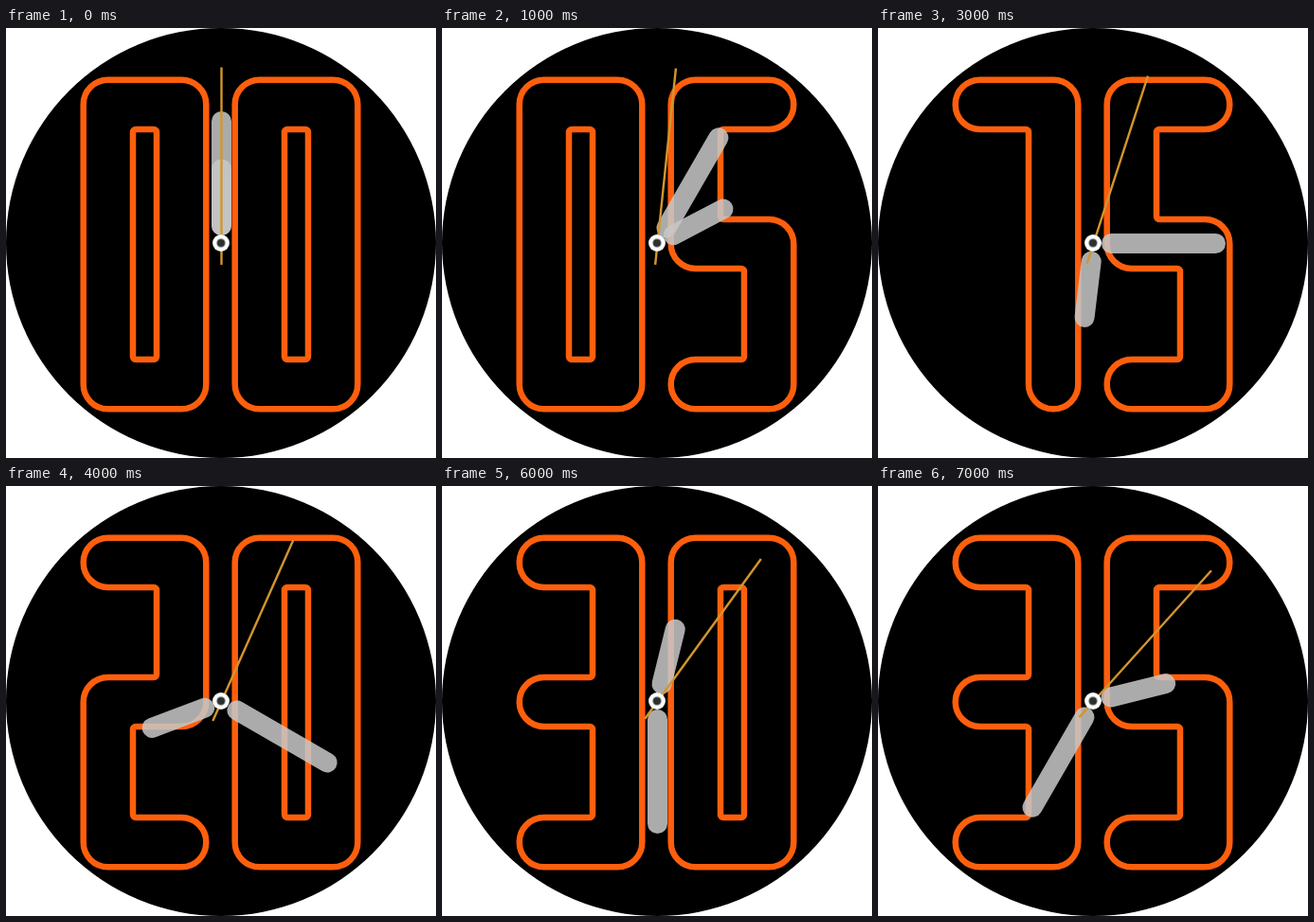
Recreate the animation shown at these times as an HTML page with a canvas. Size 454x454 px, loop 8 s.

```html
<!DOCTYPE html>
<html lang="en">
<head>
<meta charset="utf-8">
<title>Clock face with outlined minutes</title>
<style>
  html, body { margin: 0; width: 100%; height: 100%; overflow: hidden; background: #fff; }
  canvas { display: block; }
</style>
</head>
<body>
<canvas id="face" width="454" height="454"></canvas>
<script>
const ctx = document.getElementById('face').getContext('2d');
const CENTER = 227, PIVOT = 227.5, STEP = 1000, STEPS = 8;

// Grid lines shared by all digits; each outline is a list of "column row" pairs.
const COLS = [81.7, 134, 159, 211.3];
const ROWS = [54.7, 107, 202, 254, 350, 402.3];
const DIGITS = {
  0: ['00 30 35 05', '11 21 24 14'],
  1: ['00 30 35 25 21 01'],
  2: ['00 30 33 13 14 34 35 05 02 22 21 01'],
  3: ['00 30 35 05 04 24 23 03 02 22 21 01'],
  5: ['00 30 31 11 12 32 35 05 04 24 23 03']
};

function outline(shape, dx) {
  const pts = shape.split(' ').map(([c, r]) => ({
    x: COLS[c] + dx,
    y: ROWS[r],
    r: c % 3 === 0 || r % 5 === 0 ? 26 : 3
  }));
  const last = pts[pts.length - 1];
  ctx.beginPath();
  ctx.moveTo((pts[0].x + last.x) / 2, (pts[0].y + last.y) / 2);
  pts.forEach((p, i) => {
    const next = pts[(i + 1) % pts.length];
    ctx.arcTo(p.x, p.y, next.x, next.y, p.r);
  });
  ctx.closePath();
  ctx.stroke();
}

function digit(value, dx) {
  ctx.strokeStyle = '#ff5f0c';
  ctx.lineWidth = 6.5;
  DIGITS[value].forEach(shape => outline(shape, dx));
}

function disc(radius, color) {
  ctx.fillStyle = color;
  ctx.beginPath();
  ctx.arc(CENTER, CENTER, radius, 0, Math.PI * 2);
  ctx.fill();
}

function hand(degrees, from, to, width, color, cap) {
  ctx.save();
  ctx.translate(PIVOT, PIVOT);
  ctx.rotate(degrees * Math.PI / 180);
  ctx.strokeStyle = color;
  ctx.lineWidth = width;
  ctx.lineCap = cap;
  ctx.beginPath();
  ctx.moveTo(0, -from);
  ctx.lineTo(0, -to);
  ctx.stroke();
  ctx.restore();
}

function draw(n) {
  const minutes = n * 5;
  const grey = 'rgba(200, 200, 200, 0.86)';
  ctx.clearRect(0, 0, 454, 454);
  disc(227, '#000');
  digit(Math.floor(minutes / 10), 0);
  digit(minutes % 10, 160);
  hand(n * 62.3, 19, 78.5, 21, grey, 'round');
  hand(n * 30, 19, 129, 21, grey, 'round');
  hand(n * 6, -22.5, 186, 2.4, '#d2962c', 'butt');
  disc(9, '#d8d8d8');
  disc(8.4, '#fff');
  disc(4.8, '#8a8f8c');
  disc(3.8, '#2c302e');
}

const start = performance.now();
let shown = -1;
function tick() {
  const n = Math.floor(Math.max(0, performance.now() - start) / STEP) % STEPS;
  if (n !== shown) draw(shown = n);
  requestAnimationFrame(tick);
}
tick();
</script>
</body>
</html>
```
